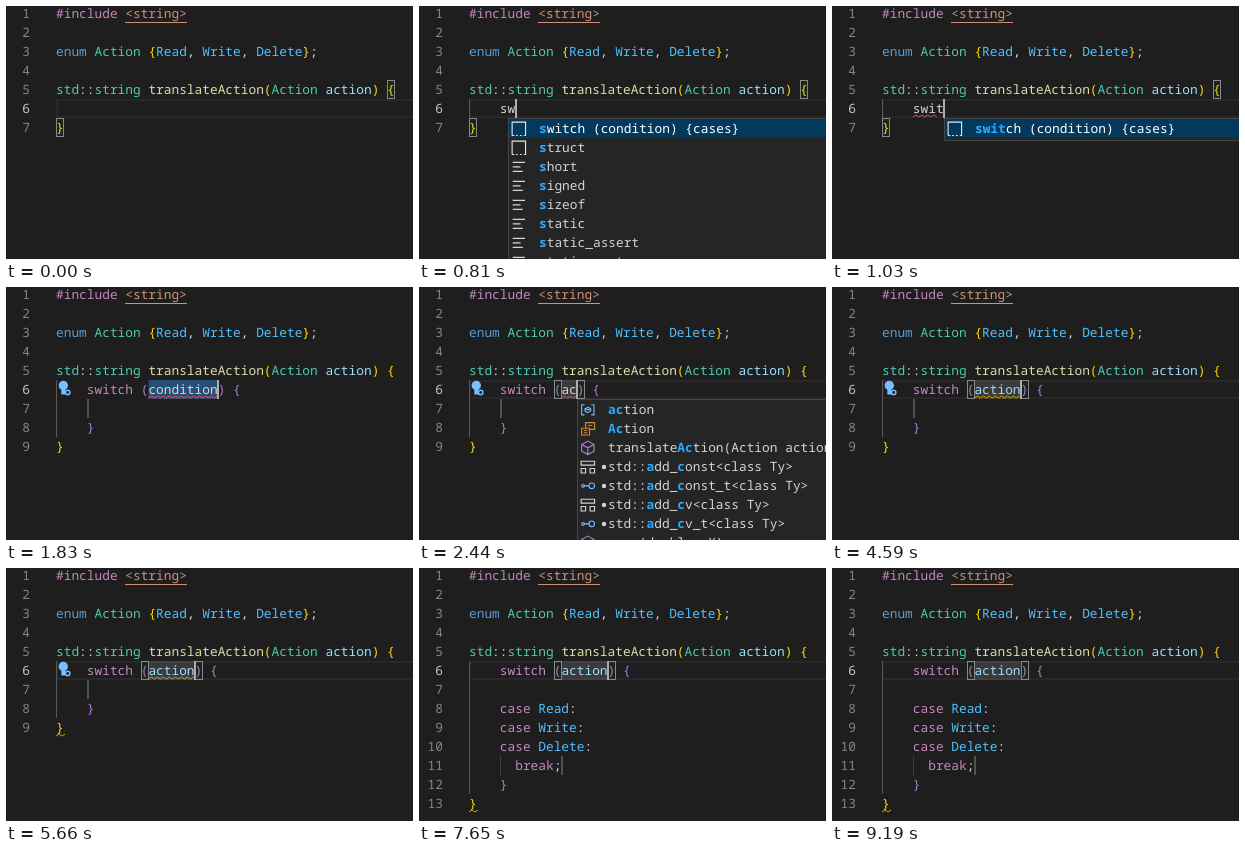
An HTML page for the animation above (9.39 s loop, 407x253 px).

```html
<!DOCTYPE html>
<html lang="en">
<head>
<meta charset="utf-8">
<title>Switch completion</title>
<style>
html, body { margin: 0; width: 100%; height: 100%; overflow: hidden; background: #1e1e1e; }
svg { display: block; }
text {
  font: 500 12.83px "Noto Sans Mono", "DejaVu Sans Mono", monospace;
  white-space: pre;
  text-rendering: geometricPrecision;
}
.b { font-weight: 700; }
.menu { font: 12px "Open Sans", "Noto Sans", sans-serif; }
</style>
</head>
<body>
<svg id="stage" width="407" height="253" viewBox="0 0 407 253"></svg>
<script>
const LOOP = 9390, CHAR = 7.7, ROW = 19;
const stage = document.getElementById('stage');
const COLORS = {
  m: '#c586c0', o: '#ce9178', k: '#569cd6', t: '#4ec9b0', y: '#ffd700', c: '#4fc1ff',
  w: '#d4d4d4', f: '#dcdcaa', v: '#9cdcfe', p: '#b078d4', b: '#2aaaff', W: '#ffffff'
};

// Timelines: [time, value] steps, or plain lists of on/off toggles.
const WORD = [[0, ''], [600, 's'], [740, 'sw'], [890, 'swi'], [960, 'swit'], [1100, 'switc'], [1230, 'switch']];
const COND = [[1500, 'condition'], [2230, 'a'], [2370, 'ac'], [3310, 'act'], [3440, 'acti'], [3510, 'actio'], [3580, 'action']];
const POPUP = [
  [0, ''], [670, 's'], [820, 'sw'], [890, 'swi'], [1030, 'swit'], [1230, 'switc'], [1300, 'switch'], [1500, ''],
  [2300, 'a'], [2440, 'ac'], [3440, 'act'], [3510, 'acti'], [3580, 'actio'], [3650, 'action'], [4320, '']
];
const CARET = [400, 1960, 2230, 2910, 3310, 4060, 4590, 5050, 5660, 6200, 6660, 7190, 7650, 8180, 8640, 9190];
const BULB = [1830, 2510, 2780, 3310, 3930, 5730];

const SNIPPET = ['snippet', 'switch (condition) {cases}'];
const S_ITEMS = [SNIPPET, ['snippet', 'struct'], ['key', 'short'], ['key', 'signed'], ['key', 'sizeof'],
  ['key', 'static'], ['key', 'static_assert'], ['key', 'static_cast']];
const A_ITEMS = [['variable', 'action'], ['enum', 'Action'], ['method', 'translateAction(Action action)'],
  ['struct', '•std::add_const<class Ty>'], ['type', '•std::add_const_t<class Ty>'],
  ['struct', '•std::add_cv<class Ty>'], ['type', '•std::add_cv_t<class Ty>'], ['method', 'acos(double _X)']];

const ICONS = {
  snippet: ['#e8e8e8', 'M1 13v-12h12v12M1 13h2m1.5 0h1.5m2 0h1.5m2 0h2'],
  key: ['#d4d4d4', 'M1.5 3h11M1.5 7h7M1.5 11h9'],
  variable: ['#75beff', 'M4 2.5h-2.5v9h2.5M10 2.5h2.5v9h-2.5M4.5 6l3-1.5 2 1.5v2l-3 1.5-2-1.5zl2.5 1 2.5-1'],
  enum: ['#d08a35', 'M5 6v-4.5h8v6h-4M1.5 6.5h7v6h-7zM7 4h4M3.5 8.5h3M3.5 10.5h3'],
  method: ['#b180d7', 'M7 1l5.5 3v6l-5.5 3-5.5-3v-6zM1.5 4l5.5 3 5.5-3M7 7v6'],
  struct: ['#d4d4d4', 'M1 2h12v3.5h-12zM1 8.5h4v4h-4zM9 8.5h4v4h-4z'],
  type: ['#75beff', 'M1.5 7a1.2 1.2 0 1 0 2.4 0a1.2 1.2 0 1 0-2.4 0M4 7h4M8 7a2.5 2.5 0 1 0 5 0a2.5 2.5 0 1 0-5 0']
};

const at = (steps, t) => steps.reduce((value, [start, next]) => t >= start ? next : value, '');
const isOn = (toggles, t) => toggles.filter(s => t >= s).length % 2 === 1;
const colX = col => 50 + CHAR * col;
const lineY = line => ROW * line - 21;
const esc = s => s.replace(/&/g, '&amp;').replace(/</g, '&lt;');
const rect = (x, y, w, h, fill, extra = '') =>
  `<rect x="${x}" y="${y}" width="${w}" height="${h}" fill="${fill}" ${extra}/>`;
const stroke = (d, color, extra = '') => `<path d="${d}" fill="none" stroke="${color}" ${extra}/>`;

// Each part is a colour key followed by its text.
const text = (x, y, parts) => `<text x="${x}" y="${y}">` +
  parts.map(p => `<tspan class="${p[0]}" fill="${COLORS[p[0]]}">${esc(p.slice(1))}</tspan>`).join('') + '</text>';
const code = (line, col, ...parts) => text(colX(col), lineY(line) + 14, parts);

const bracketBox = (line, col) =>
  rect(Math.round(colX(col)) + .5, lineY(line) + .5, 7, 18, 'rgba(0,100,0,.1)', 'stroke="#888"');
const tabStop = (line, col) => rect(Math.round(colX(col)), lineY(line), 2, ROW, '#525252');

function squiggle(line, col, length, color) {
  const x = colX(col), waves = Math.max(2, Math.round(length * CHAR / 3));
  let d = `M${x} ${lineY(line) + 18}`;
  for (let i = 0; i < waves; i++) d += `l3 ${i % 2 ? 2 : -2}`;
  return stroke(d, color);
}

function gutter(count) {
  let out = '';
  for (let n = 1; n <= count; n++)
    out += `<text x="24" y="${lineY(n) + 14}" text-anchor="end" fill="${n === 6 ? '#c6c6c6' : '#858585'}">${n}</text>`;
  return out;
}

function matchParts(label, query, base) {
  const low = label.toLowerCase(), start = low.indexOf(query), hits = new Set();
  let pos = -1;
  [...query].forEach((ch, i) => {
    pos = start >= 0 ? start + i : low.indexOf(ch, pos + 1);
    hits.add(pos);
  });
  return [...label].map((ch, i) => (hits.has(i) ? 'b' : base) + ch);
}

function popup(query, col) {
  const isWord = query[0] === 's';
  const items = query === 's' ? S_ITEMS : isWord ? [SNIPPET] : A_ITEMS.slice(0, query.length > 2 ? 3 : 8);
  const x = Math.round(colX(col));
  let out = rect(x + .5, 112.5, 430, items.length * ROW + 3, '#252526', 'stroke="#454545"');
  items.forEach(([kind, label], i) => {
    const y = 113 + i * ROW, active = isWord && i === 0, [color, d] = ICONS[kind];
    const dotted = label[0] === '•', name = dotted ? label.slice(1) : label;
    if (active) out += rect(x + 1, y, 429, ROW, '#04395e');
    out += stroke(d, color, `transform="translate(${x + 3} ${y + 2}) scale(1.12)"`);
    if (dotted) out += `<circle cx="${x + 27}" cy="${y + 10}" r="2.2" fill="${COLORS.w}"/>`;
    out += text(x + 31, y + 14, matchParts(name, query, active ? 'W' : 'w'));
  });
  return out;
}

const bulb = () =>
  '<g fill="#75beff"><circle cx="57.3" cy="98.5" r="4.7"/><path d="M55.3 102h4v5.5h-4z"/></g>' +
  '<circle cx="61.7" cy="105.5" r="2.2" fill="#1e1e1e" stroke="#75beff" stroke-width="1.5"/>';

const fixMenu = () =>
  rect(189.5, 114.5, 161, 51, '#252526', 'stroke="#454545" rx="4"') +
  '<text class="menu" x="199" y="132" fill="#9d9d9d">Quick Fix</text>' +
  rect(193, 139, 154, 23, '#04395e', 'rx="3"') +
  '<circle cx="204" cy="149" r="4" fill="#75beff"/><path d="M202 152h4v4h-4z" fill="#75beff"/>' +
  '<text class="menu" x="215" y="155" fill="#fff">Add missing cases</text>';

function draw(t) {
  const inserted = t >= 1500, filled = t >= 5730, selected = inserted && t < 2230;
  const word = at(WORD, t), cond = at(COND, t), query = at(POPUP, t);
  const last = filled ? 13 : inserted ? 9 : 7;
  const caretCol = inserted ? 12 + cond.length : 4 + word.length;
  let out = rect(0, 0, 407, 253, '#1e1e1e');

  if (!selected) out += rect(51, 94, 400, 17, 'none', 'stroke="#282828" stroke-width="2"');
  if (word) out += rect(50, 93, 1, (last - 6) * ROW, '#585858');
  if (inserted) {
    out += rect(colX(12), 93, cond.length * CHAR, ROW, selected ? '#264f78' : 'rgba(124,124,124,.3)');
    out += filled ? rect(81, lineY(11), 1, ROW, '#404040') + tabStop(11, 12) : tabStop(7, 4);
    if (!selected) out += bracketBox(6, 11) + bracketBox(6, caretCol);
  } else {
    out += bracketBox(5, 43) + bracketBox(7, 0);
  }

  out += gutter(last);
  out += code(1, 0, 'm#include ', 'o<string>') + rect(119, 16, 62, 1, COLORS.o);
  out += code(3, 0, 'kenum ', 'tAction ', 'y{', 'cRead', 'w, ', 'cWrite', 'w, ', 'cDelete', 'y}', 'w;');
  out += code(5, 0, 'tstd', 'w::', 'tstring ', 'ftranslateAction', 'y(', 'tAction ', 'vaction', 'y) {');
  out += code(last, 0, 'y}');

  if (inserted) {
    out += code(6, 4, 'mswitch ', 'p(', (t >= 3930 ? 'v' : 'w') + cond, 'p) {');
    out += code(last - 1, 4, 'p}');
    if (t >= 1830 && t < 5800) out += squiggle(6, 12, cond.length, t < 3930 ? '#f14c4c' : '#cca700');
    if (t >= 5660) out += squiggle(last, 0, 1, '#cca700');
  } else {
    out += code(6, 4, (word === 'switch' ? 'm' : 'w') + word);
    // The error mark trails the typing.
    if (t >= 820 && word !== 'switch') out += squiggle(6, 4, Math.min(word.length, 3), '#f14c4c');
  }
  if (filled) {
    const name = t >= 6000 ? 'c' : 'w';
    ['Read', 'Write', 'Delete'].forEach((s, i) => out += code(8 + i, 4, 'mcase ', name + s, 'w:'));
    out += code(11, 6, 'mbreak', 'w;');
  }

  if (isOn(BULB, t)) out += bulb();
  if (query) out += popup(query, (inserted ? 12 : 4) + query.length);
  if (t >= 5250 && t < 5660) out += fixMenu();
  if (isOn(CARET, t)) out += rect(Math.floor(colX(caretCol)), 93, 2, ROW, '#aeafad');
  return out;
}

let shown = '';
function tick() {
  const next = draw(performance.now() % LOOP);
  if (next !== shown) stage.innerHTML = shown = next;
  requestAnimationFrame(tick);
}
tick();
</script>
</body>
</html>
```
